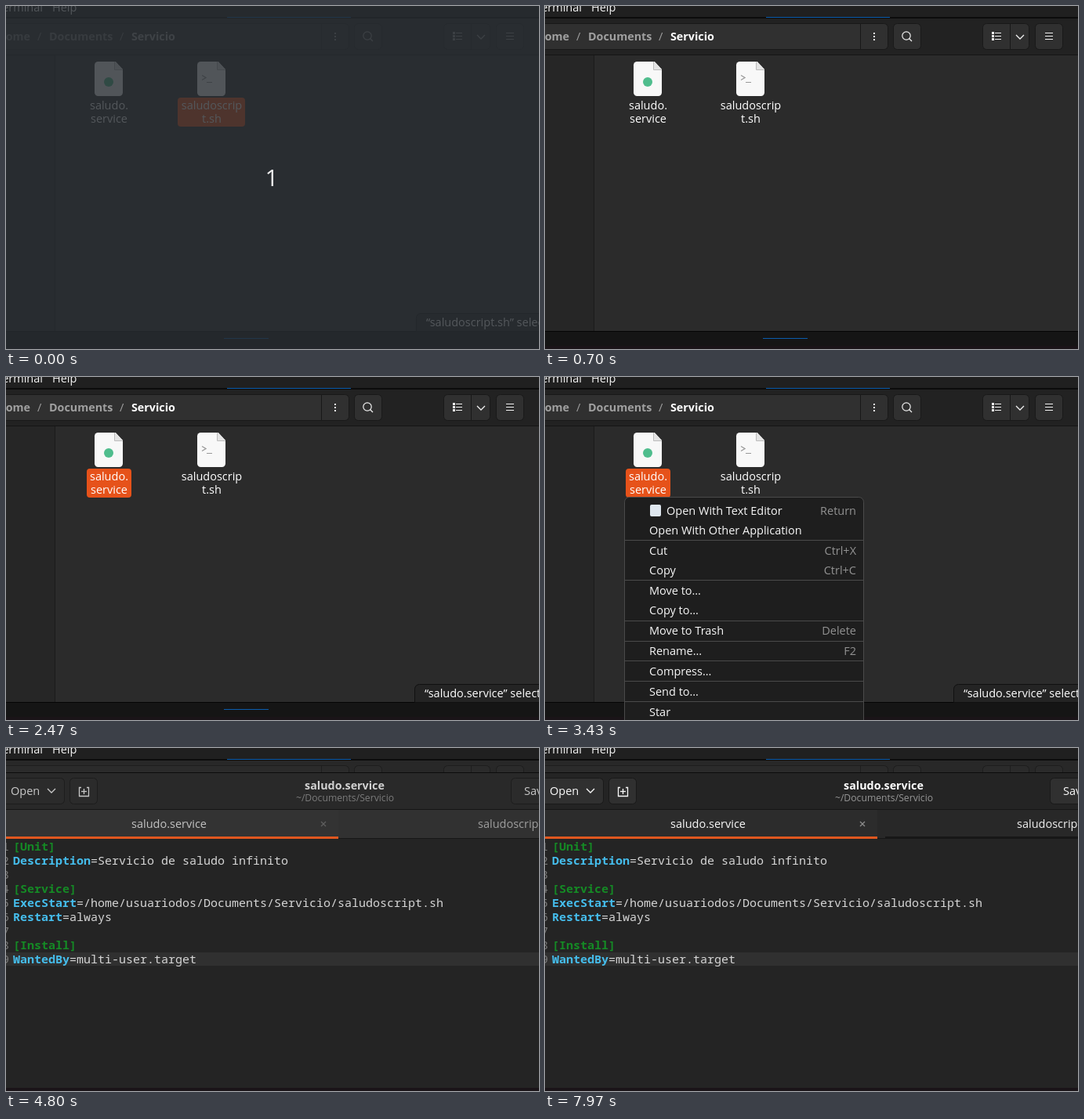
These frames come from a looping animation (680 px wide and 438 px high, 8 s). An HTML page with a canvas:

```html
<!DOCTYPE html>
<html>
<head>
<meta charset="utf-8">
<style>
html, body { margin: 0; overflow: hidden; background: #111; }
canvas { display: block; }
</style>
</head>
<body>
<canvas id="stage" width="680" height="438"></canvas>
<script>
const c = document.getElementById('stage').getContext('2d');
const LOOP = 8000, ORANGE = '#e6521a', BLUE = '#0b5cad';
const SANS = '14.5px "Open Sans", "Noto Sans", sans-serif';
const BOLD = 'bold 14.3px "Open Sans", "Noto Sans", sans-serif';
const SMALL = '12.2px "Open Sans", "Noto Sans", sans-serif';
const MONO = '15px "Noto Sans Mono", "DejaVu Sans Mono", monospace';

let focus = 1;
const ramp = (t, from, to) => {
  const p = Math.min(1, Math.max(0, (t - from) / (to - from)));
  return p * (2 - p);
};
const grey = v => `rgb(${v},${v},${v})`;
// Grey level that moves from unfocused to focused
const tone = (off, on) => grey(Math.round(off + (on - off) * focus));

function box(x, y, w, h, fill) {
  c.fillStyle = fill;
  c.fillRect(x, y, w, h);
}

function round(x, y, w, h, r, fill, stroke) {
  c.beginPath();
  c.roundRect(x, y, w, h, r);
  if (fill) { c.fillStyle = fill; c.fill(); }
  if (stroke) { c.strokeStyle = stroke; c.lineWidth = 1; c.stroke(); }
}

function text(str, x, y, fill, font = SANS, align = 'left') {
  c.font = font;
  c.textAlign = align;
  c.fillStyle = fill;
  c.fillText(str, x, y);
}

function shape(points, fill) {
  c.beginPath();
  for (let i = 0; i < points.length; i += 2) c.lineTo(points[i], points[i + 1]);
  c.fillStyle = fill;
  c.fill();
}

function line(stroke, width, ...points) {
  c.beginPath();
  for (let i = 0; i < points.length; i += 2) c.lineTo(points[i], points[i + 1]);
  c.strokeStyle = stroke;
  c.lineWidth = width;
  c.stroke();
}

function button(x, y, w, h, r = 5) {
  round(x + .5, y + .5, w - 1, h - 1, r, tone(43, 48), tone(29, 25));
}

function chevron(x, y, ink) {
  line(ink, 1.3, x - 5, y - 2, x, y + 3, x + 5, y - 2);
}

function drawDesktop() {
  box(0, 0, 680, 438, '#1a1418');
  box(0, 0, 680, 14, '#202020');
  text('Terminal', 47, 7, '#f4f4f4', SANS, 'right');
  text('Help', 59, 7, '#f4f4f4');
  box(0, 14, 680, 2, '#0c0c0c');
  box(282, 14, 158, 1, BLUE);
  box(0, 415, 680, 19, '#151515');
  box(0, 415, 680, 1, '#050505');
  box(278, 424, 57, 1, BLUE);
}

function drawToolbar() {
  const ink = tone(140, 240), dim = tone(115, 160);
  box(0, 16, 680, 46, tone(40, 34));
  box(0, 62, 680, 1, '#151515');
  button(-10, 22, 448, 34);
  box(402, 23, 1, 32, tone(30, 24));
  text('Home', 31, 44, dim, BOLD, 'right');
  text('/', 40, 44, dim);
  text('Documents', 55, 44, dim, BOLD);
  text('/', 145, 44, dim);
  text('Servicio', 160, 44, tone(150, 255), BOLD);
  for (const y of [34, 38, 42]) box(419, y, 2, 2, ink);

  button(444, 22, 36, 34);
  c.beginPath();
  c.arc(461, 38, 5.2, 0, 7);
  c.strokeStyle = ink;
  c.lineWidth = 1.2;
  c.stroke();
  line(ink, 1.3, 464.5, 41.5, 468, 45);

  button(558, 22, 60, 34);
  box(593, 23, 1, 32, tone(30, 24));
  button(625, 22, 36, 34);
  for (const y of [34, 38, 42]) {
    box(570, y - 1, 3, 3, ink);
    box(574, y, 8, 1, ink);
    box(638, y, 10, 1, ink);
  }
  chevron(606, 39, ink);
}

function drawFile(x, lines, selected, width) {
  const mid = x + 18;
  round(x, 71, 36, 44, 4.5, '#f8f8f8');
  shape([x + 26, 70, x + 37, 70, x + 37, 82], '#2b2b2b');
  shape([x + 26, 71, x + 36, 81, x + 26, 81], '#e4e4e4');
  line('#bcbcbc', 1, x + 25.5, 71, x + 25.5, 81.5, x + 36, 81.5);
  if (selected) round(Math.ceil(mid - width / 2), 117, width, 37, 4, ORANGE);
  lines.forEach((str, i) => text(str, mid + .5, 132 + i * 17, '#fff', SANS, 'center'));
}

function drawFiles(selected, status) {
  drawToolbar();
  box(0, 63, 62, 352, tone(42, 38));
  box(62, 63, 1, 352, '#1a1a1a');
  box(63, 63, 617, 352, '#2b2b2b');
  drawFile(113, ['saludo.', 'service'], selected === 'saludo.service', 57);
  c.beginPath();
  c.arc(131, 97, 6, 0, 7);
  c.fillStyle = '#4fbd8d';
  c.fill();
  drawFile(244, ['saludoscrip', 't.sh'], selected === 'saludoscript.sh', 86);
  line('#999', 1.3, 250, 88.5, 255, 91.5, 250, 94.5);
  box(256, 97, 7, 1, '#999');
  if (status) {
    const x = status === 'saludo.service' ? 521 : 523;
    round(x + .5, 392.5, 180, 23, [6, 0, 0, 0], '#242424', '#101010');
    text(`“${status}” selected`, x + 13, 409, '#fff');
  }
}

// label, accelerator, mnemonic position, text centre
const MENU = [
  ['Open With Text Editor', 'Return', -1, 171],
  ['Open With Other Application', '', 16, 196],
  ['Cut', 'Ctrl+X', 2, 222],
  ['Copy', 'Ctrl+C', 0, 247],
  ['Move to…', '', -1, 273],
  ['Copy to…', '', -1, 298],
  ['Move to Trash', 'Delete', 2, 324],
  ['Rename…', 'F2', 4, 350],
  ['Compress…', '', 0, 376],
  ['Send to…', '', -1, 402],
  ['Star', '', -1, 428]
];

function drawMenu(active) {
  round(101.5, 153.5, 305, 300, 6, '#1e1e1e', '#4a4a4a');
  if (active) box(102, 158, 304, 25, '#3b3b3b');
  for (const y of [208, 259, 311, 337, 362, 388, 414]) box(102, y, 304, 1, '#4a4a4a');
  MENU.forEach(([label, key, mnemonic, y], i) => {
    const x = i ? 133 : 155;
    text(label, x, y + 5, '#f7f7f7');
    if (active && mnemonic >= 0) {
      const start = c.measureText(label.slice(0, mnemonic)).width;
      box(x + start, y + 7, c.measureText(label[mnemonic]).width, 1, '#f7f7f7');
    }
    text(key, 397, y + 5, '#929292', SANS, 'right');
  });
  round(134, 163, 14, 15, 2, '#dfe7ef');
}

const UNIT = [
  '[Unit]', 'Description=Servicio de saludo infinito', '',
  '[Service]', 'ExecStart=/home/usuariodos/Documents/Servicio/saludoscript.sh',
  'Restart=always', '', '[Install]', 'WantedBy=multi-user.target'
];

function drawEditor(cursor, tabHover) {
  const ink = tone(195, 250);
  box(0, 31, 680, 1, '#0c0c0c');
  box(0, 32, 680, 46, tone(42, 36));
  box(0, 78, 680, 1, '#161616');
  button(-10, 38, 85, 34);
  text('Open', 6, 60, ink);
  chevron(58, 54, ink);
  button(81, 38, 36, 34);
  line(ink, 1.3, 96, 50.5, 93.5, 50.5, 93.5, 61.5, 105.5, 61.5, 105.5, 50.5, 103, 50.5);
  line(ink, 1.3, 99.5, 52, 99.5, 59);
  line(ink, 1.3, 96, 55.5, 103, 55.5);
  button(644, 38, 60, 34);
  text('Save', 661, 60, ink);
  text('saludo.service', 432, 53, tone(205, 255), BOLD, 'center');
  text('~/Documents/Servicio', 432.5, 68, tone(120, 150), SMALL, 'center');

  box(0, 79, 680, 36, tone(50, 40));
  box(0, 79, 424, 36, tone(52, 44));
  text('saludo.service', 208, 102, tone(190, 250), SANS, 'center');
  text('saludoscript.sh', 602, 102, tone(150, 240));
  const cross = tone(90, 140);
  line(cross, 1.2, 402, 94, 408, 100);
  line(cross, 1.2, 402, 100, 408, 94);
  box(0, 115, 680, 319, '#242424');
  box(0, 115, 680, 1, '#171717');
  box(0, 113, 424, 3, '#e0571f');
  if (tabHover) box(434, 113, 246, 2, '#171717');

  box(0, 261, 680, 17, '#303030');
  UNIT.forEach((str, i) => {
    const y = 131 + i * 18, [key, ...rest] = str.split('=');
    text(i + 1, 4, y, '#777', MONO, 'right');
    text(key, 9, y, str[0] === '[' ? '#158a25' : '#45bdec', 'bold ' + MONO);
    if (rest.length) text('=' + rest.join('='), 9 + key.length * 9, y, '#d6d6d6', MONO);
  });
  if (cursor) box(243, 260, 1, 18, '#f0f0f0');
}

// Value of the last [start, value] entry that has begun
const at = (steps, t) => steps.filter(s => s[0] <= t).pop()[1];
const UNIT_FILE = 'saludo.service', SCRIPT = 'saludoscript.sh';
const SELECTED = [[0, SCRIPT], [470, ''], [1570, UNIT_FILE], [1930, SCRIPT], [2270, UNIT_FILE]];
const STATUS = [[0, SCRIPT], [470, ''], [1770, UNIT_FILE], [2130, SCRIPT], [2470, UNIT_FILE]];
const CURSOR = [[0, true], [5200, false], [5600, true], [6400, false], [6830, true], [7600, false]];

function draw(t) {
  const editing = t >= 4770;
  drawDesktop();
  focus = editing ? 0 : ramp(t, 470, 700);
  drawFiles(at(SELECTED, t), at(STATUS, t));
  if (editing) {
    focus = ramp(t, 4790, 5030);
    drawEditor(t >= 4830 && at(CURSOR, t), t >= 7970);
  } else if (t >= 3430) {
    drawMenu(t >= 4100);
  }
  if (t < 30) {
    box(0, 0, 680, 438, 'rgba(41,46,51,.8)');
    text('1', 339, 230, '#eee', '30px "Open Sans", "Noto Sans", sans-serif', 'center');
  }
}

function tick() {
  draw(performance.now() % LOOP);
  requestAnimationFrame(tick);
}
tick();
</script>
</body>
</html>
```
